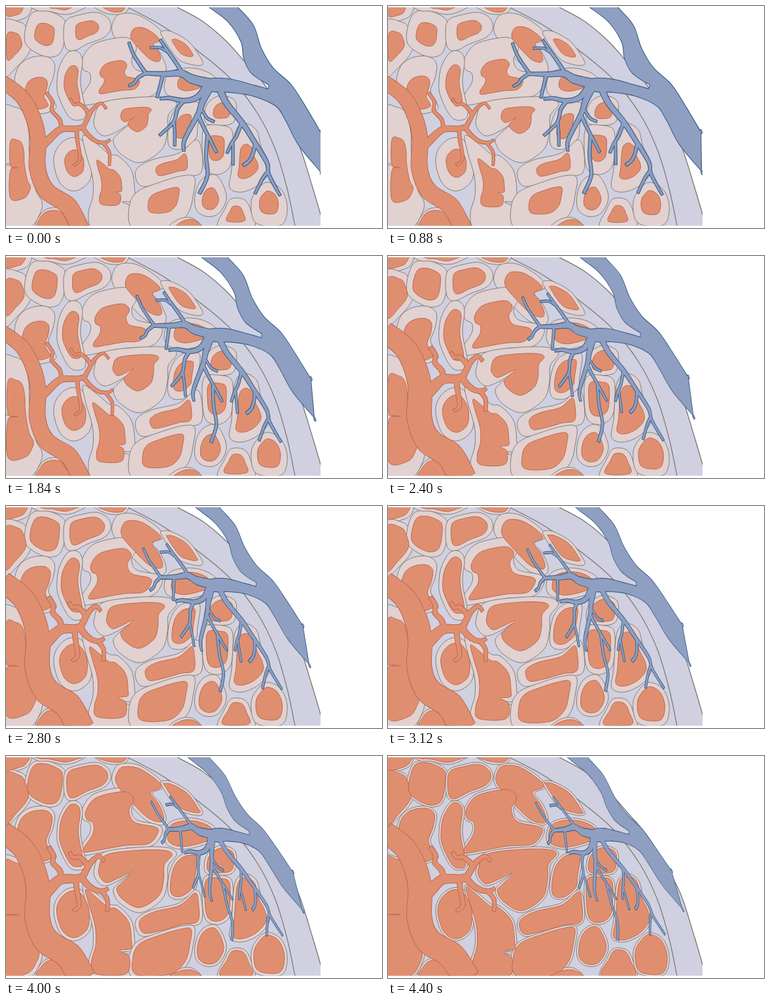
An HTML page for the animation above (5.2 s loop, 575x340 px).

```html
<!DOCTYPE html>
<html lang="en">
<head>
<meta charset="utf-8">
<title>Swelling cells</title>
<style>
html, body { margin: 0; width: 100%; height: 100%; overflow: hidden; background: #fff; }
svg { display: block; width: 100vw; height: 100vh; }
</style>
</head>
<body>
<svg viewBox="0 0 575 340">
  <clipPath id="view"><rect y="2" width="481" height="334.5"/></clipPath>
  <g id="scene" clip-path="url(#view)" stroke-linejoin="round"></g>
</svg>
<script>
const scene = document.getElementById('scene');
const SALMON = '#df8f70', RUST = '#bd6650', BLUE = '#8f9fc1', NAVY = '#3a618b', GREY = '#77776f';
const LOOP = 5200, HOLD = 720, TICK = 80, STEPS = 47;

const parse = text => text.split(' ').map(p => p.split(',').map(Number));
const fmt = p => p[0].toFixed(2) + ' ' + p[1].toFixed(2);
const lerp = (a, b, t) => a + (b - a) * t;

function addPath(fill, stroke = 'none', width = 0, d = '') {
  const el = document.createElementNS('http://www.w3.org/2000/svg', 'path');
  for (const [k, v] of Object.entries({ d, fill, stroke, 'stroke-width': width })) el.setAttribute(k, v);
  return scene.appendChild(el);
}

// Catmull-Rom spline; a doubled point makes a corner.
function curve(points, closed) {
  const n = points.length;
  const at = i => points[closed ? (i + n) % n : Math.max(0, Math.min(n - 1, i))];
  let d = 'M' + fmt(points[0]);
  for (let i = 0; i < (closed ? n : n - 1); i++) {
    const [a, b, c, e] = [at(i - 1), at(i), at(i + 1), at(i + 2)];
    const h1 = [b[0] + (c[0] - a[0]) / 6, b[1] + (c[1] - a[1]) / 6];
    const h2 = [c[0] - (e[0] - b[0]) / 6, c[1] - (e[1] - b[1]) / 6];
    d += `C${fmt(h1)} ${fmt(h2)} ${fmt(c)}`;
  }
  return d + (closed ? 'Z' : '');
}

// Outline of a vessel along a centre line, tapering from one width to another.
function tube({ points, from, to }, girth = 1) {
  const left = [], right = [], last = points.length - 1;
  points.forEach(([x, y], i) => {
    const a = points[Math.max(0, i - 1)], b = points[Math.min(last, i + 1)];
    const r = lerp(from, to, i / last) * girth / 2 / Math.hypot(b[0] - a[0], b[1] - a[1]);
    const nx = -(b[1] - a[1]) * r, ny = (b[0] - a[0]) * r;
    left.push([x + nx, y + ny]);
    right.unshift([x - nx, y - ny]);
  });
  return curve(left) + curve(right).replace('M', 'L') + 'Z';
}

// Tissue and its capsule
const capsule = curve(parse('262,2 300,23 335,52 364,84 395,120 420,160 447,210 468,275 483,326'));
addPath('#d0d0e0', 'none', 0, capsule + 'L483 337L0 337L0 2Z');
addPath('none', GREY, 1.3, capsule);
addPath('none', GREY, 1.2, curve(parse('186,2 240,31 300,74 345,113 385,165 412,220 430,280 442,337')));

// Moves every point of a closed outline inwards.
function inset(points, depth) {
  const n = points.length, next = i => points[(i + 1) % n], prev = i => points[(i + n - 1) % n];
  const area = points.reduce((sum, p, i) => sum + p[0] * next(i)[1] - p[1] * next(i)[0], 0);
  return points.map(([x, y], i) => {
    const dx = next(i)[0] - prev(i)[0], dy = next(i)[1] - prev(i)[1];
    const k = Math.sign(area) * depth / Math.hypot(dx, dy);
    return [x - dy * k, y + dx * k];
  });
}

const middle = values => (Math.min(...values) + Math.max(...values)) / 2;
const nuclei = [];

// A nucleus begins as a small copy of its cell and swells until it fills it.
function cell(outline, x, y, scale) {
  const points = parse(outline);
  addPath('#e1d1d0', GREY, .9, curve(points, true));
  const mx = middle(points.map(p => p[0])), my = middle(points.map(p => p[1]));
  const small = points.map(p => [x + (p[0] - mx) * scale, y + (p[1] - my) * scale]);
  nuclei.push({ small, full: inset(points, 3.2) });
}

cell('-8,-5 36,-5 37,10 25,20 -8,25', 13, 8, .5);
cell('-8,27 22,25 33,38 38,65 18,92 -8,108', 13, 62, .48);
cell('37,14 60,7 85,17 91,30 88,60 78,76 55,76 29,55', 59, 43, .48);
cell('38,-5 48,7 65,8 90,13 110,8 124,-5', 84, 2, .45);
cell('88,45 92,22 115,13 140,10 157,20 160,35 150,48 125,58 105,68 92,65', 124, 37, .49);
cell('130,-5 150,10 172,13 185,8 183,-5', 163, 4, .6);
cell('163,42 167,18 182,11 205,15 232,33 241,48 224,57 236,72 245,95 238,106 215,99 188,73', 214, 59, .55);
cell('238,45 240,38 255,40 280,55 298,80 300,90 285,90 262,80', 270, 64, .5);
cell('242,122 250,102 275,95 300,98 320,110 318,128 300,137 270,143 248,137', 282, 118, .5);
cell('117,80 135,58 178,48 196,55 199,68 192,82 200,98 234,106 238,120 222,138 185,141 150,147 118,152 113,142 128,118 128,103 118,97',
  173, 109, .49);
cell('15,125 18,95 35,80 60,77 74,88 72,110 65,130 73,145 75,158 45,163', 47, 133, .55);
cell('78,115 82,92 95,71 110,70 117,84 114,118 122,165 110,175 95,168 80,137', 101, 121, .55);
cell('-8,158 14,155 28,165 35,195 36,230 45,280 55,300 52,318 35,340 -8,340 -8,250 16,243 -8,236', 22, 250, .48);
cell('48,340 52,320 65,310 85,310 95,322 100,340', 72, 327, .85);
cell('73,240 78,218 95,203 115,205 130,230 130,262 118,278 100,283 82,270', 104, 241, .5);
cell('118,198 140,212 158,227 172,230 192,252 197,285 195,299 178,300 193,310 186,340 134,340 126,318 133,290 132,260 122,225',
  158, 270, .48);
cell('135,172 148,148 200,140 245,140 261,150 248,168 247,192 238,220 205,240 175,226 164,207 172,195 190,180 170,192 150,199 137,188',
  199, 174, .37);
cell('248,190 255,165 270,150 290,147 297,155 293,185 290,203 270,219 250,215', 271, 184, .5);
cell('304,160 312,145 330,137 350,145 352,165 345,180 320,183 305,178', 330, 160, .52);
cell('300,215 304,185 330,183 345,190 347,215 343,245 325,258 305,250', 322, 218, .5);
cell('350,195 365,180 383,190 390,215 400,235 402,255 385,275 360,285 342,278 345,250', 370, 238, .5);
cell('198,262 202,247 225,235 265,225 290,205 299,220 298,255 270,262 235,272 208,276', 253, 243, .47);
cell('188,310 200,285 235,270 270,260 288,262 287,285 278,318 250,340 195,340', 241, 297, .47);
cell('290,285 300,265 318,258 330,270 337,295 325,318 305,322 290,310', 313, 295, .52);
cell('325,340 335,310 345,295 365,297 375,315 378,340', 351, 318, .5);
cell('375,300 385,280 400,270 420,280 430,305 425,332 405,338 380,330', 402, 301, .52);
cell('250,340 265,326 285,325 298,340', 279, 334, .8);
for (const n of nuclei) n.el = addPath(SALMON, RUST, 1);

const vessel = (line, from, to) => ({ points: parse(line), from, to });

const arteryTrunk = vessel('-5,116 25,140 42,172 49,205 48,248 62,283 95,306 114,342', 20, 27);
const arteryTwigs = [
  vessel('48,222 66,204 84,189 108,188 120,184', 12, 6),
  vessel('85,190 82,174 70,160 71,147 62,133', 5, 4),
  vessel('118,186 125,172 133,158 145,149 153,157', 6, 3),
  vessel('128,168 122,158 112,150 104,151 98,142', 5, 3),
  vessel('118,188 128,200 140,208 152,209 159,205', 6, 3),
  vessel('148,209 158,224 158,244', 4, 3),
  vessel('108,190 109,205 113,234 104,244', 5, 3)
];

const veinTrunk = parse('290,-15 290,-15 312,2 340,24 360,55 364,80 376,103 403,121 403,121 401,128 401,128 380,122 340,112 305,113 306,127 320,131 345,132 380,138 413,153 428,175 448,213 481,253 481,253 481,194 481,194 455,150 435,120 408,95 390,65 378,30 354,2 340,-15 340,-15');
const veinTwigs = [
  vessel('325,122 285,112 268,103 245,104 212,103', 15, 4),
  vessel('188,56 195,74 205,90 214,103', 3, 4),
  vessel('213,103 202,110 196,118 188,122', 4, 3),
  vessel('236,52 248,70 262,90 270,104', 3, 5),
  vessel('221,64 236,64 246,70', 2.5, 2.5),
  vessel('240,105 235,125 231,140', 4, 3),
  vessel('305,125 292,140 272,145 250,141 236,142', 9, 3),
  vessel('270,147 262,158 256,178 235,198', 5, 3),
  vessel('257,178 258,195 258,214', 3, 3),
  vessel('310,128 300,148 294,165 273,205 272,222', 10, 3),
  vessel('293,165 302,185 322,224', 5, 3),
  vessel('300,160 308,172 318,177', 3, 3),
  vessel('308,199 306,230 308,260 296,287', 4, 4),
  vessel('328,130 338,150 362,180 378,205 399,240 402,258 419,290', 9, 3),
  vessel('360,180 352,200 345,210 338,225', 4, 3),
  vessel('347,208 347,225 347,243', 3, 3),
  vessel('381,210 378,225 372,237 363,244', 4, 4),
  vessel('400,254 392,265 381,287', 4, 3)
];

// A wide line below and a plain fill above merge all limbs into one outline.
const layers = (fill, stroke, width, d) => [addPath(fill, stroke, width, d), addPath(fill, 'none', 0, d)];
const arteryLayers = layers(SALMON, RUST, 2);
const veinLayers = layers(BLUE, NAVY, 2.4, curve(veinTrunk, true) + veinTwigs.map(v => tube(v)).join(''));
const setAll = (els, name, value) => els.forEach(el => el.setAttribute(name, value));

// The veins shear and squeeze about the root of their branches.
function veinMatrix(p) {
  const rootX = 325, rootY = 122;
  const a = 1 - .42 * p, b = -.09 * p, c = .27 * p, d = 1 - .05 * p;
  const e = rootX - a * rootX - c * rootY - 1.5 * p, f = rootY - b * rootX - d * rootY;
  return `matrix(${[a, b, c, d, e, f].map(v => v.toFixed(5))})`;
}

const ramp = (step, from, to) => Math.max(0, Math.min(1, (step - from) / (to - from)));

// The artery widens midway, drawing its twigs in, and drifts right at the end.
function arteryPath(step) {
  const wide = ramp(step, 15, 22);
  const pulse = Math.sin(Math.PI * ramp(step, 0, 20));
  const stretch = .08 * pulse + .2 * ramp(step, 38, STEPS);
  const reach = 1 - .12 * wide, hubX = 84, hubY = 188;
  const drift = ([x, y]) => [x + Math.max(0, x - hubX) * stretch, y];
  const draw = (limb, place) => tube({ ...limb, points: limb.points.map(place) }, 1 + .55 * wide);
  return draw(arteryTrunk, drift) + arteryTwigs.map(limb => draw(limb, ([x, y]) =>
    drift([lerp(hubX, x, reach), lerp(hubY, y, reach)]))).join('');
}

let shown = -1;
function draw(time) {
  const t = time % LOOP;
  const step = t < HOLD ? 0 : Math.min(STEPS, Math.floor((t - HOLD) / TICK) + 1);
  if (step === shown) return;
  shown = step;
  const p = step / STEPS;
  for (const { el, small, full } of nuclei) {
    el.setAttribute('d', curve(small.map((s, i) => [lerp(s[0], full[i][0], p), lerp(s[1], full[i][1], p)]), true));
  }
  setAll(arteryLayers, 'd', arteryPath(step));
  setAll(veinLayers, 'transform', veinMatrix(p));
}

const start = performance.now();
function frame() {
  draw(performance.now() - start);
  requestAnimationFrame(frame);
}
frame();
</script>
</body>
</html>
```
